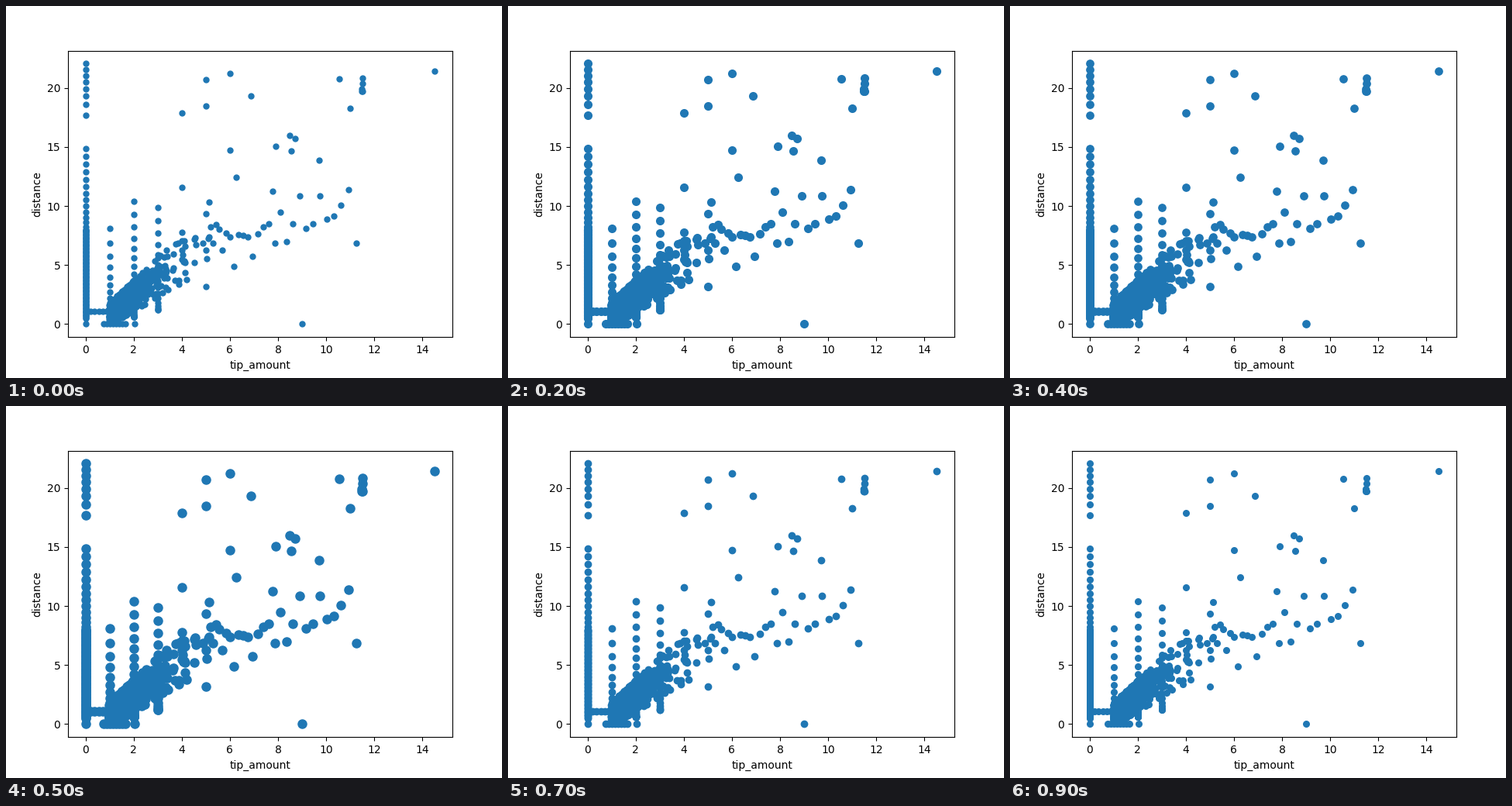
A matplotlib script that plays this animation: 640x480 px, repeating every 1 s.

```python
import numpy as np
import matplotlib.pyplot as plt
from matplotlib.animation import FuncAnimation

rng = np.random.default_rng(7)

MARKER_SIZES = [25, 40, 49, 28, 45, 64, 49, 36, 144, 30]
MAX_TIP, MAX_DISTANCE = 14.52, 22.06
MARGIN = 0.05

# Isolated trips that give the plot its outline.
LANDMARKS = [
    (MAX_TIP, 21.4), (10.54, 20.75), (11.0, 18.27), (9.0, 0), (6, 21.26),
    (5, 20.7), (5, 18.5), (4, 17.87), (6.87, 19.3), (6, 14.73), (4, 11.6),
    (9.7, 13.87), (6.25, 12.42), (7.77, 11.23), (2.05, 0),
]


def column(tip, low, high, count, power=1.0):
    """Trips with one round tip, thinning out upwards as power grows."""
    distances = low + (high - low) * np.linspace(0, 1, count) ** power
    return np.column_stack([np.full(count, tip), distances])


def row(distance, low, high, count):
    return np.column_stack([np.linspace(low, high, count),
                            np.full(count, distance)])


def cluster(center, spread, count):
    return rng.normal(center, spread, (count, 2))


def short_trips(count):
    """Dense cloud where distance and its spread grow with the tip."""
    tips = np.minimum(0.9 + rng.gamma(2.0, 0.55, count), 5.2)
    spread = np.clip(rng.normal(0, 1, count), -1.8, 1.8)
    distances = 1.55 * tips - 0.7 + spread * (0.3 + 0.2 * tips)
    floor = 0.4
    return np.column_stack([tips, floor + abs(distances - floor)])


def medium_trips(count):
    """Sparse band that continues the cloud to the right."""
    tips = 5.1 + 6.15 * np.linspace(0, 1, count) ** 1.5
    distances = 7.2 + 0.45 * (tips - 5) + rng.normal(0, 1.4, count)
    return np.column_stack([tips, distances])


points = np.vstack([
    LANDMARKS,
    column(0, 0, 0, 1),
    column(0, 0.5, 8, 90),
    column(0, 8, 14.87, 14, 1.3),
    column(0, 17.7, MAX_DISTANCE, 8, 0.8),
    column(1, 0.4, 8.1, 24, 4),
    column(2, 0.6, 10.4, 26, 3),
    column(3, 1.2, 9.85, 16, 2),
    column(4, 5.5, 7.8, 4),
    column(5, 3.15, 9.35, 3),
    row(0, 0.77, 1.67, 8),
    row(1.05, 0.2, 0.9, 5),
    cluster((11.52, 20.2), (0.08, 0.5), 5),
    cluster((8.5, 15.4), (0.45, 0.8), 4),
    short_trips(520),
    medium_trips(30),
])

fig, ax = plt.subplots(figsize=(6.4, 4.8), dpi=100)
dots = ax.scatter(*points.T, s=MARKER_SIZES[0], color="#1f77b4")
ax.set_xlim(-MARGIN * MAX_TIP, (1 + MARGIN) * MAX_TIP)
ax.set_ylim(-MARGIN * MAX_DISTANCE, (1 + MARGIN) * MAX_DISTANCE)
ax.set_xlabel("tip_amount")
ax.set_ylabel("distance")


def update(frame):
    dots.set_sizes([MARKER_SIZES[frame]])
    return (dots,)


anim = FuncAnimation(fig, update, frames=len(MARKER_SIZES), interval=100,
                     repeat=True, repeat_delay=0)
plt.show()
```
